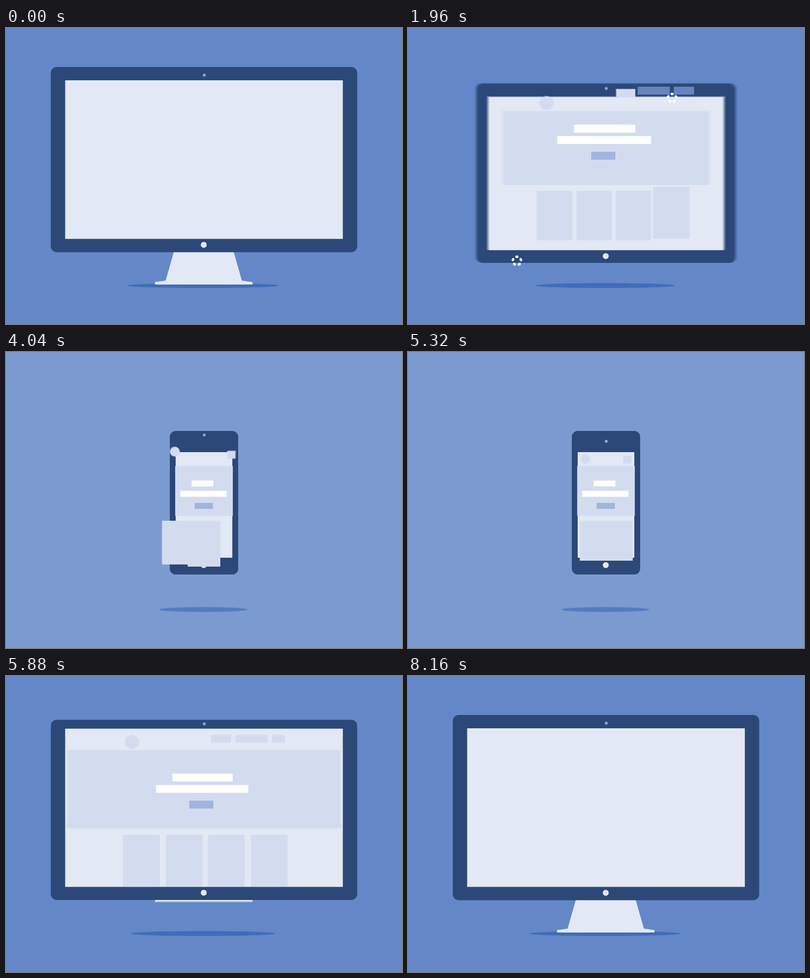
An HTML page with a canvas that plays this animation: 800 by 600 pixels, repeating every 8660 ms.

```html
<!DOCTYPE html>
<html lang="en">
<head>
<meta charset="utf-8">
<title>Responsive devices</title>
<style>
  html, body { margin: 0; width: 100%; height: 100%; overflow: hidden; background: #6488c7; }
  canvas { display: block; width: 800px; height: 600px; }
</style>
</head>
<body>
<canvas id="stage" width="800" height="600"></canvas>
<script>
const LOOP = 8660, STEP = 40, SHUTTER = 20, SAMPLES = 8, MID = 400;
const TABLET = 1600, TABLET_END = 2400, PHONE = 3760, DESKTOP = 5320;
const BUILT = 1040, CLEAR = 7120, CLEARED = 8160;
const HOLDS = [[BUILT, TABLET], [TABLET_END, PHONE], [4440, DESKTOP], [6200, CLEAR], [CLEARED, LOOP]];
const DARK = '#2b4878', SCREEN = '#e2e8f4', BUTTON = '#a0b5dd', WHITE = '#fff';
const BLOCK = [211, 220, 239], NAV_BLUE = [65, 104, 176];

const stage = document.getElementById('stage').getContext('2d');
const layer = document.createElement('canvas');
layer.width = 800;
layer.height = 600;
const ctx = layer.getContext('2d');

const clamp = x => Math.min(1, Math.max(0, x));
const smooth = x => x * x * (3 - 2 * x);
const out = x => 1 - (1 - x) ** 2;
const mix = (a, b, k) => a.map((v, i) => v + (b[i] - v) * k);
const ramp = (t, start, dur, ease = smooth) => ease(clamp((t - start) / dur));
const hump = (t, start, dur) => Math.sin(Math.PI * clamp((t - start) / dur)) ** 2;
const rgba = (c, a = 1) => `rgba(${c.map(Math.round)},${a})`;

// Moves a list of values from desktop to tablet to phone and back.
function morph(t, [desk, tab, phone], { lag = 0, slow = 280, wait = 0, back = 650 } = {}) {
  const start = TABLET + 80 + lag;
  let v = mix(desk, tab, ramp(t, start, Math.min(600, TABLET_END - start)));
  v = mix(v, phone, ramp(t, PHONE, slow));
  return mix(v, desk, ramp(t, DESKTOP + wait, back, out));
}

// Size of a page part while the page is built and later cleared.
function grow(t, start, dur, end = CLEARED - start - dur, endDur = dur) {
  return ramp(t, start, dur) * (1 - ramp(t, end, endDur));
}

function rect(cx, cy, w, h, fill, scale = 1) {
  ctx.fillStyle = fill;
  ctx.fillRect(cx - w * scale / 2, cy - h * scale / 2, w * scale, h * scale);
}

function span(half, top, low, fill, radius = 0) {
  ctx.fillStyle = fill;
  ctx.beginPath();
  ctx.roundRect(MID - half, top, 2 * half, low - top, radius);
  ctx.fill();
}

function oval(x, y, rx, ry, fill, turn = 0) {
  ctx.fillStyle = fill;
  ctx.beginPath();
  ctx.ellipse(x, y, rx, ry, turn, 0, 7);
  ctx.fill();
}

function drawGround(t) {
  const timing = { lag: 280, wait: 240, back: 280 };
  const ground = morph(t, [[100, 136, 199], [73, 115, 189], [123, 154, 208]], timing);
  const shade = morph(t, [[64, 109, 184], [60, 98, 160], [84, 124, 192]], timing);
  const [half] = morph(t, [[152.5], [123.5], [89]], { lag: 16, back: 840 });
  rect(MID, 300, 800, 600, rgba(ground));
  oval(398.3, 522, half, 5, rgba(shade));
}

function drawStand(t) {
  const up = ramp(t, TABLET, 200) - ramp(t, 5840, 280);
  if (up > 0.98) return;
  const half = [[60.5, 454], [77, 512], [98.5, 515], [98.5, 520]];
  const outline = [...half, ...half.map(([x, y]) => [-x, y]).reverse()];
  ctx.fillStyle = SCREEN;
  ctx.beginPath();
  outline.forEach(([x, y]) => ctx.lineTo(399.5 + x, y - 66 * up));
  ctx.fill();
}

function drawDevice(t) {
  // The lower half swings past its rest when the device changes size.
  const swing = 13 * hump(t, 1660, 600) + 7 * hump(t, DESKTOP, 480);
  const [half] = morph(t, [[309.5], [126], [69]], { lag: 80, back: 556 });
  const [top, low] = morph(t, [[79, 454.5], [132, 468], [160, 451]], { lag: -73, back: 860 });
  const [glass] = morph(t, [[280.5], [112.2], [57.2]], { lag: 85, back: 533 });
  const [glassTop, glassLow] = morph(t, [[106, 427.5], [161.5, 444], [203, 417]], { lag: -60, back: 612 });
  const [home] = morph(t, [[439.5], [456], [432]], { lag: -60 });
  const [camera] = morph(t, [[95.5], [147], [181]], { lag: -30, slow: 480 });

  span(half, top, low + swing, DARK, 12);
  span(glass, glassTop, glassLow + swing, SCREEN);
  oval(400.5, camera, 3, 3, '#8da5d2');
  oval(399.5, home + swing, 6, 6, SCREEN);
}

function drawHero(t) {
  const [half, top, low] = morph(t, [[280.5, 149, 308], [112.5, 194.5, 331.5], [58.2, 231, 332]], { lag: 8 });
  rect(MID, (top + low) / 2, 2 * half, low - top, rgba(BLOCK), grow(t, 0, 600));

  // Centre and width of each bar on the three devices.
  const bars = [
    [[397, 204, 124.5], [400, 240, 124.5], [397, 266.5, 44]],
    [[396.3, 227, 189.5], [403.3, 263, 189.5], [398.8, 287.5, 93.5]],
    [[394.5, 259, 49], [399.5, 297, 49], [399.5, 312, 37]]
  ];
  const [h] = morph(t, [[16], [16], [12]], { lag: 280 });
  bars.forEach((places, i) => {
    const [x, y, w] = morph(t, places, { lag: 280 + 40 * i, back: 680 });
    rect(x, y, w, h, i < 2 ? WHITE : BUTTON, grow(t, 500 + 120 * i, 300));
  });
}

function drawCards(t) {
  const left = [236, 323, 408, 495], gone = [LOOP, 4040, 3800, 1960];
  left.forEach((x, i) => {
    const desk = [x, 322, 74, 105];
    const tab = i < 3 ? [297 + 70 * i, 342, 66, 93] : desk;
    const phone = i ? tab : [347, 342, 107, 81];
    const [cx, cy, w, h] = morph(t, [desk, tab, phone], { lag: 20, slow: i ? 280 : 690, back: 600 });
    const alpha = 1 - ramp(t, gone[i], 160) + (i && ramp(t, 5400 + 25 * i, 250));
    const size = grow(t, 420 + 50 * i, 460, 7880 - 200 * i, 280);
    ctx.fillStyle = rgba(BLOCK, alpha);
    ctx.fillRect(cx, cy, w, h * size);
  });
}

function drawHeader(t) {
  const [x, y] = morph(t, [[248, 128], [313, 177], [358, 217]], { lag: -16, slow: 480, back: 745 });
  const [r] = morph(t, [[14], [11.5], [10]], { lag: 280 });
  const size = r * grow(t, 200, 300);
  oval(x, y, size, size, rgba(BLOCK));

  // The first item becomes the menu square; it returns to its place unseen.
  const [mx, my, mw] = morph(t, [[434.5, 127, 41], [492.5, 177.7, 17], [443, 218.3, 17]],
    { lag: 180, slow: 415, wait: 180, back: 1 });
  const shown = 1 - ramp(t, DESKTOP, 160) + ramp(t, 5640, 200);
  rect(mx, my, mw, 16, rgba(BLOCK, shown), grow(t, 300, 300));

  // The other two turn blue on their way out and in.
  const away = ramp(t, 1800, 240) - ramp(t, 5520, 240);
  const tint = rgba(mix(BLOCK, NAV_BLUE, away), clamp(13 * (1 - away)));
  const last = 26.5 + 14.5 * clamp(2 * away);
  rect(496.5, 127, 65, 16, tint, grow(t, 360, 300));
  rect(537 + last / 2, 127, last, 16, tint, grow(t, 420, 300));
}

function drawBurst(t, x, y) {
  const age = (t - 1880) / 200;
  if (age <= 0 || age >= 1) return;
  const r = 13 * out(age), size = (1 - age) / 0.6;
  for (let i = 0; i < 5; i++) {
    const a = i * Math.PI * 0.4 - Math.PI / 2;
    oval(x + r * Math.cos(a), y + r * Math.sin(a), 3.3 * size, 2.6 * size, WHITE, a + Math.PI / 2);
  }
}

function drawScene(t) {
  drawGround(t);
  drawStand(t);
  drawDevice(t);
  drawHero(t);
  drawCards(t);
  drawHeader(t);
  drawBurst(t, 220, 472);
  drawBurst(t, 533.5, 142);
}

// Averages several moments around t to give motion blur.
function render(t) {
  const still = HOLDS.some(([a, b]) => t >= a && t <= b);
  const count = still ? 1 : SAMPLES;
  for (let i = 0; i < count; i++) {
    drawScene(t + SHUTTER * ((i + 0.5) / count - 0.5));
    stage.globalAlpha = 1 / (i + 1);
    stage.drawImage(layer, 0, 0);
  }
}

let shown = -1;
function tick() {
  const t = Math.floor(performance.now() % LOOP / STEP) * STEP;
  if (t !== shown) render(shown = t);
  requestAnimationFrame(tick);
}
tick();
</script>
</body>
</html>
```
